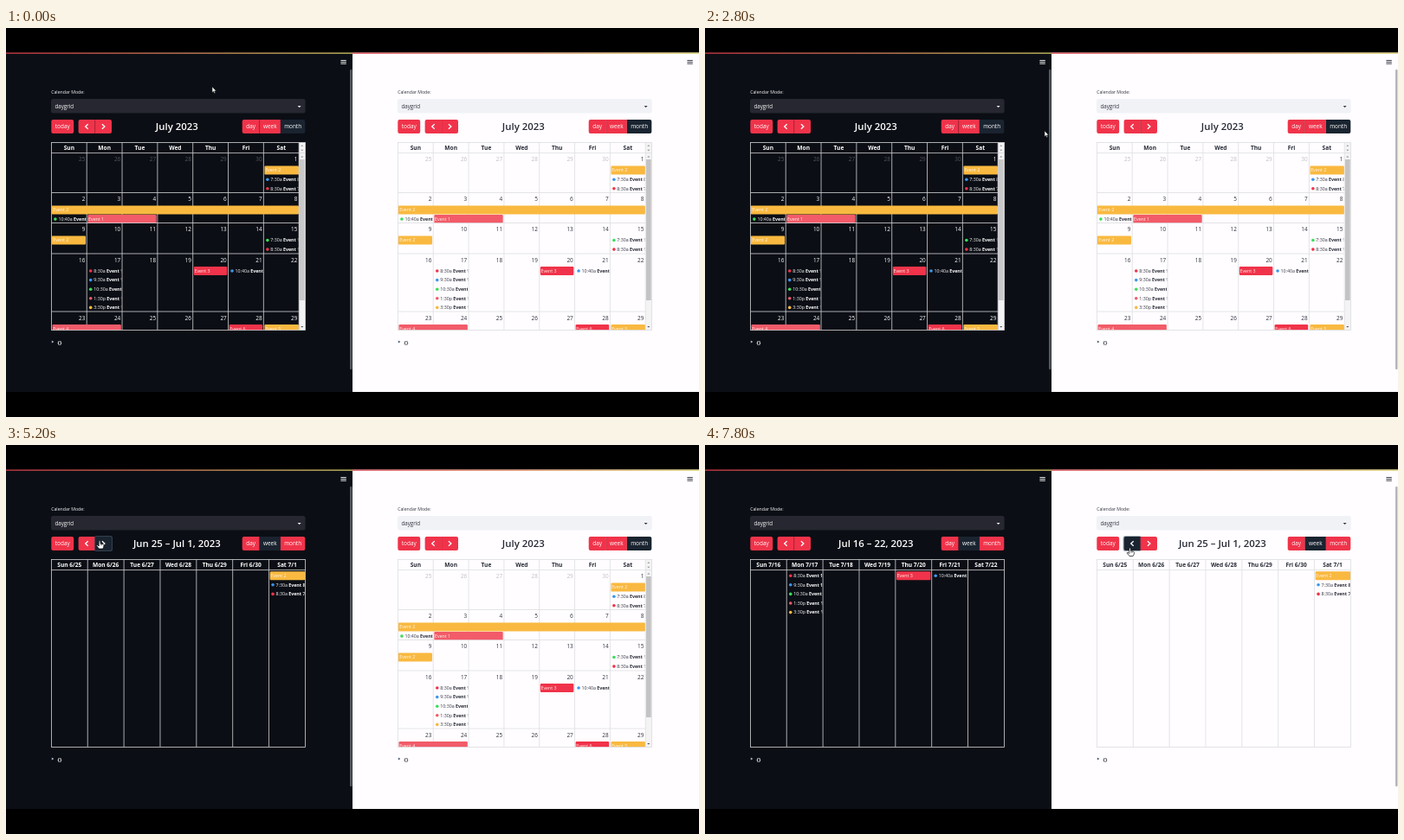
An HTML page with a canvas that plays this animation: 800x450 px, repeating every 8 s.

```html
<!DOCTYPE html>
<html lang="en">
<head>
<meta charset="utf-8">
<title>Calendar in two themes</title>
<style>
  html, body { margin: 0; width: 100%; height: 100%; overflow: hidden; background: #000; }
  canvas { display: block; width: 800px; height: 450px; }
</style>
</head>
<body>
<canvas id="stage"></canvas>
<script>
const LOOP = 8000, STEP = 200;
const FONT = '"Open Sans", "Noto Sans", sans-serif';
const RED = '#f0334a', PINK = '#f25b69', YELLOW = '#f9b940';
const BLUE = '#3d97ea', GREEN = '#3ddc5b', ACTIVE = '#1a2430';
const DAYS = ['Sun', 'Mon', 'Tue', 'Wed', 'Thu', 'Fri', 'Sat'];
const LEFT = 52.4, RIGHT = 345.4, TOP = 132.5, BODY = 144.6, BOTTOM = 349.4;
const ROWS = [BODY, 190.5, 225.5, 261, 328, 394];

const THEMES = [
  { x: 0, bg: '#0b0e15', text: '#fafafa', title: '#fff', field: '#262730', line: '#d4d4d6', off: 0.3,
    page: '#54575e', drag: '#787878', thumb: '#c9c9c9' },
  { x: 400, bg: '#fffdff', text: '#31333f', title: '#272a36', field: '#f0f2f6', line: '#dddde0', off: 0.3,
    page: '#b4b5ba', drag: '#a3a3a5', thumb: '#c3c3c5' }
];

// Days count from July 1; June days are zero or negative.
const bar = (from, to, name, color, slot = 0) => ({ from, to, name, color, slot });
const timed = (day, time, name, color, slot) => ({ from: day, to: day, time, name, color, slot });
const EVENTS = [
  bar(1, 9, 'Event 2', YELLOW),
  timed(1, '7:30a', 'Event 8', BLUE, 1),
  timed(1, '8:30a', 'Event 7', RED, 2),
  timed(2, '10:40a', 'Event 9', GREEN, 1),
  bar(3, 4, 'Event 1', PINK, 1),
  timed(15, '7:30a', 'Event 10', GREEN, 0),
  timed(15, '8:30a', 'Event 11', RED, 1),
  timed(17, '8:30a', 'Event 12', RED, 0),
  timed(17, '9:30a', 'Event 13', BLUE, 1),
  timed(17, '10:30a', 'Event 14', GREEN, 2),
  timed(17, '1:30p', 'Event 15', PINK, 3),
  timed(17, '3:30p', 'Event 16', YELLOW, 4),
  bar(20, 20, 'Event 3', RED),
  timed(21, '10:40a', 'Event 17', BLUE, 0),
  bar(23, 24, 'Event 4', PINK),
  bar(28, 28, 'Event 6', RED),
  bar(29, 30, 'Event 5', YELLOW)
];

// Cursor tip: [time, x, y]
const PATH = [
  [0, 238, 68], [400, 278, 96], [800, 341, 154], [1000, 343, 156], [1200, 348, 158],
  [1600, 738, 172], [2000, 743, 191], [2400, 728, 170], [2800, 392, 119], [3200, 306, 114],
  [3600, 304, 113], [4000, 94, 110], [4600, 94, 110], [4800, 108, 111], [6400, 108, 111],
  [6800, 440, 122], [7200, 703, 114], [7400, 703, 114], [7800, 490.5, 119.5]
];

// First day of the week shown from a given time; null is the month.
const VIEWS = [
  [[0, null], [3600, -5], [4200, -12], [5000, -5], [5400, 2], [5800, 9], [6200, 16]],
  [[0, null], [7400, -5]]
];
// Spans in which each page scrollbar is visible.
const PAGE_BARS = [[[0, 1400], [2600, 6800]], [[1400, 3000], [6800, LOOP]]];

const canvas = document.getElementById('stage');
const ctx = canvas.getContext('2d');
const ratio = window.devicePixelRatio || 1;
canvas.width = 800 * ratio;
canvas.height = 450 * ratio;

function rect(x, y, w, h, color, radius = 0) {
  ctx.fillStyle = color;
  ctx.beginPath();
  ctx.roundRect(x, y, w, h, radius);
  ctx.fill();
}

function line(points, color, width = 0.8) {
  ctx.strokeStyle = color;
  ctx.lineWidth = width;
  ctx.beginPath();
  points.forEach(([x, y]) => ctx.lineTo(x, y));
  ctx.stroke();
}

function polygon(points, fill, stroke, width = 0.7) {
  ctx.beginPath();
  points.forEach(([x, y]) => ctx.lineTo(x, y));
  ctx.closePath();
  ctx.fillStyle = fill;
  ctx.fill();
  if (stroke) {
    ctx.strokeStyle = stroke;
    ctx.lineWidth = width;
    ctx.stroke();
  }
}

// Text is centred vertically on y; returns its width.
function text(str, x, y, size, color, weight = 400, align = 'left') {
  ctx.font = `${weight} ${size}px ${FONT}`;
  ctx.textAlign = align;
  ctx.fillStyle = color;
  ctx.fillText(str, x, y + size * 0.35);
  return ctx.measureText(str).width;
}

function clipped(x, y, w, h, paint) {
  ctx.save();
  ctx.beginPath();
  ctx.rect(x, y, w, h);
  ctx.clip();
  paint();
  ctx.restore();
}

function triangle(x, y, size, dir, color) {
  polygon([[x - size, y - dir * size / 2], [x + size, y - dir * size / 2], [x, y + dir * size / 2]], color);
}

function cursorAt(t) {
  const i = Math.max(1, PATH.findIndex(key => key[0] >= t));
  const [t0, x0, y0] = PATH[i - 1], [t1, x1, y1] = PATH[i];
  const k = (t - t0) / (t1 - t0), e = k * k * (3 - 2 * k);
  return { x: x0 + (x1 - x0) * e, y: y0 + (y1 - y0) * e };
}

const viewAt = (views, t) => views.filter(v => v[0] <= t).pop()[1];

const BUTTONS = [
  { x: 52.3, w: 25.9, label: 'today', round: 2 },
  { x: 83.6, w: 19.2, arrow: -1, round: [2, 0, 0, 2] },
  { x: 102.8, w: 19.2, arrow: 1, round: [0, 2, 2, 0] },
  { x: 272.7, w: 20, label: 'day', round: [2, 0, 0, 2] },
  { x: 292.7, w: 24.2, label: 'week', round: 0 },
  { x: 316.9, w: 28.4, label: 'month', round: [0, 2, 2, 0] }
];
const overButton = (b, p) => p.y > 106 && p.y < 122 && p.x >= b.x && p.x < b.x + b.w;

function drawToolbar(theme, week, pointer) {
  const mode = week === null ? 'month' : 'week';
  for (const b of BUTTONS) {
    const hover = overButton(b, pointer);
    const dark = hover || b.label === mode;
    if (hover) rect(b.x - 1, 105, b.w + 2, 18, 'rgba(85,105,125,.55)', 2.5);
    rect(b.x, 106, b.w, 16, dark ? ACTIVE : RED, b.round);
    const mid = b.x + b.w / 2;
    if (b.label) {
      text(b.label, mid, 114, 6.4, '#fff', 400, 'center');
    } else {
      const a = b.arrow * 1.5;
      line([[mid - a, 111.2], [mid + a, 114], [mid - a, 116.8]], '#fff', 1.3);
    }
  }
  for (const x of [102.8, 292.7]) line([[x, 106.3], [x, 121.7]], 'rgba(120,20,35,.6)', 0.6);
  text(titleOf(week), 197.3, 114.3, 11.4, theme.title, 600, 'center');
}

const monthOf = day => day < 1 ? 'Jun' : 'Jul';
const numberOf = day => day < 1 ? day + 30 : day;

function titleOf(week) {
  if (week === null) return 'July 2023';
  const end = week + 6;
  const endMonth = monthOf(end) === monthOf(week) ? '' : monthOf(end) + ' ';
  return `${monthOf(week)} ${numberOf(week)} – ${endMonth}${numberOf(end)}, 2023`;
}

function drawEvents(theme, first, colWidth, y) {
  for (const ev of EVENTS) {
    if (ev.to < first || ev.from > first + 6) continue;
    const a = Math.max(0, ev.from - first), b = Math.min(6, ev.to - first);
    const x = LEFT + a * colWidth, end = LEFT + (b + 1) * colWidth;
    const mid = y + ev.slot * 10.6;
    if (ev.time) {
      clipped(x, mid - 6, colWidth - 0.8, 12, () => {
        ctx.fillStyle = ev.color;
        ctx.beginPath();
        ctx.arc(x + 4.5, mid, 1.8, 0, 7);
        ctx.fill();
        const w = text(ev.time, x + 8, mid, 5.25, theme.text);
        text(ev.name, x + 9.4 + w, mid, 5.25, theme.title, 700);
      });
    } else {
      const l = ev.from < first ? 0.2 : 1.1, r = ev.to > first + 6 ? 0.2 : 1.2;
      rect(x + l, mid - 5, end - x - l - r, 10, ev.color, 1.2);
      text(ev.name, x + 1.8, mid, 5.3, '#fff6ee');
    }
  }
}

function drawScrollbar(theme, pointer) {
  const hover = pointer.x >= 338 && pointer.x <= 345 && pointer.y > BODY && pointer.y < BOTTOM;
  rect(338.2, TOP, 7.2, BOTTOM - TOP, '#f3f3f4');
  triangle(341.8, 136, 1.5, -1, '#8c8c8e');
  triangle(341.8, 141.5, 1.5, 1, '#8c8c8e');
  line([[338, BODY], [RIGHT, BODY]], theme.line);
  triangle(341.8, 148.8, 1.6, -1, '#8c8c8e');
  triangle(341.8, 345.8, 1.6, 1, '#505052');
  rect(339, 152, 5.7, 163, hover ? theme.drag : theme.thumb);
}

function drawCalendar(theme, week, pointer) {
  const month = week === null;
  const right = month ? 338.2 : RIGHT;
  const colWidth = (right - LEFT) / 7;
  const first = month ? -5 : week;

  DAYS.forEach((name, c) => {
    const day = first + c;
    const label = month ? name : `${name} ${day < 1 ? 6 : 7}/${numberOf(day)}`;
    text(label, LEFT + (c + 0.5) * colWidth, 139, 6.6, theme.title, 700, 'center');
  });

  clipped(LEFT, BODY, right - LEFT, BOTTOM - BODY, () => {
    for (let c = 1; c < 7; c++) {
      const x = LEFT + c * colWidth;
      line([[x, BODY], [x, BOTTOM]], theme.line);
    }
    if (!month) return drawEvents(theme, week, colWidth, 151.2);
    for (let r = 0; r < 5; r++) {
      const y = ROWS[r], start = first + r * 7;
      if (r) line([[LEFT, y], [right, y]], theme.line);
      for (let c = 0; c < 7; c++) {
        ctx.globalAlpha = start + c < 1 ? theme.off : 1;
        text(numberOf(start + c), LEFT + (c + 1) * colWidth - 1.8, y + 7.3, 6.4, theme.text, 400, 'right');
      }
      ctx.globalAlpha = 1;
      drawEvents(theme, start, colWidth, y + 20);
    }
  });

  for (let c = 1; c < 7; c++) {
    const x = LEFT + c * colWidth;
    line([[x, TOP], [x, BODY]], theme.line);
  }
  line([[LEFT, BODY], [right, BODY]], theme.line);
  if (month) {
    drawScrollbar(theme, pointer);
    line([[right, TOP], [right, BOTTOM]], theme.line);
  }
  ctx.strokeStyle = theme.line;
  ctx.lineWidth = 0.8;
  ctx.strokeRect(LEFT, TOP, RIGHT - LEFT, BOTTOM - TOP);
}

function drawPane(i, t, cursor) {
  const theme = THEMES[i];
  const pointer = { x: cursor.x - theme.x, y: cursor.y };
  const week = viewAt(VIEWS[i], t);
  ctx.save();
  ctx.translate(theme.x, 0);
  rect(0, 28.5, 400, 392.5, theme.bg);
  const strip = ctx.createLinearGradient(0, 0, 400, 0);
  strip.addColorStop(0, '#d93a48');
  strip.addColorStop(1, '#d8cf68');
  rect(0, 28.5, 400, 1.3, strip);

  for (const y of [37.5, 39.4, 41.3]) line([[386.4, y], [392.8, y]], theme.text, 0.9);
  text('Calendar Mode:', 52.2, 74, 5.2, theme.text);
  rect(52, 82, 293.6, 16.6, theme.field, 2.5);
  text('daygrid', 56.5, 90.5, 6.2, theme.text);
  triangle(338.6, 91, 2, 1, theme.text);

  drawToolbar(theme, week, pointer);
  drawCalendar(theme, week, pointer);

  polygon([[52.8, 361.4], [55.4, 363], [52.8, 364.6]], i ? '#4d5c78' : '#a9b4c6');
  text('{}', 59.6, 364.2, 6, theme.text, 700);
  if (PAGE_BARS[i].some(([a, b]) => t >= a && t < b)) rect(397, 48, 2.5, 347, theme.page, 1);
  ctx.restore();
}

function drawCursor(p) {
  const local = { x: p.x % 400, y: p.y };
  ctx.save();
  ctx.translate(p.x, p.y);
  if (BUTTONS.some(b => overButton(b, local))) {
    polygon([[-0.8, 0.4], [0, -0.4], [0.9, 0.4], [1, 3.2], [4.2, 3.8], [5, 4.8], [4.6, 7.2],
      [3.7, 9], [-0.6, 9], [-3.4, 5.4], [-2.8, 4.6], [-0.8, 6]], '#fff', '#111');
    for (const x of [1.2, 2.6]) line([[x, 3.8], [x, 5.4]], '#333', 0.5);
  } else {
    polygon([[0, 0], [0, 6.6], [1.5, 5.3], [2.5, 7.6], [3.6, 7.1], [2.6, 4.9], [4.6, 4.7]], '#fff', '#222', 0.6);
  }
  ctx.restore();
}

function draw(t) {
  ctx.setTransform(ratio, 0, 0, ratio, 0, 0);
  rect(0, 0, 800, 450, '#000');
  const cursor = cursorAt(t);
  drawPane(0, t, cursor);
  drawPane(1, t, cursor);
  drawCursor(cursor);
}

const start = performance.now();
function tick() {
  const t = (performance.now() - start) % LOOP;
  draw(Math.floor(t / STEP) * STEP);
  requestAnimationFrame(tick);
}
tick();
</script>
</body>
</html>
```
